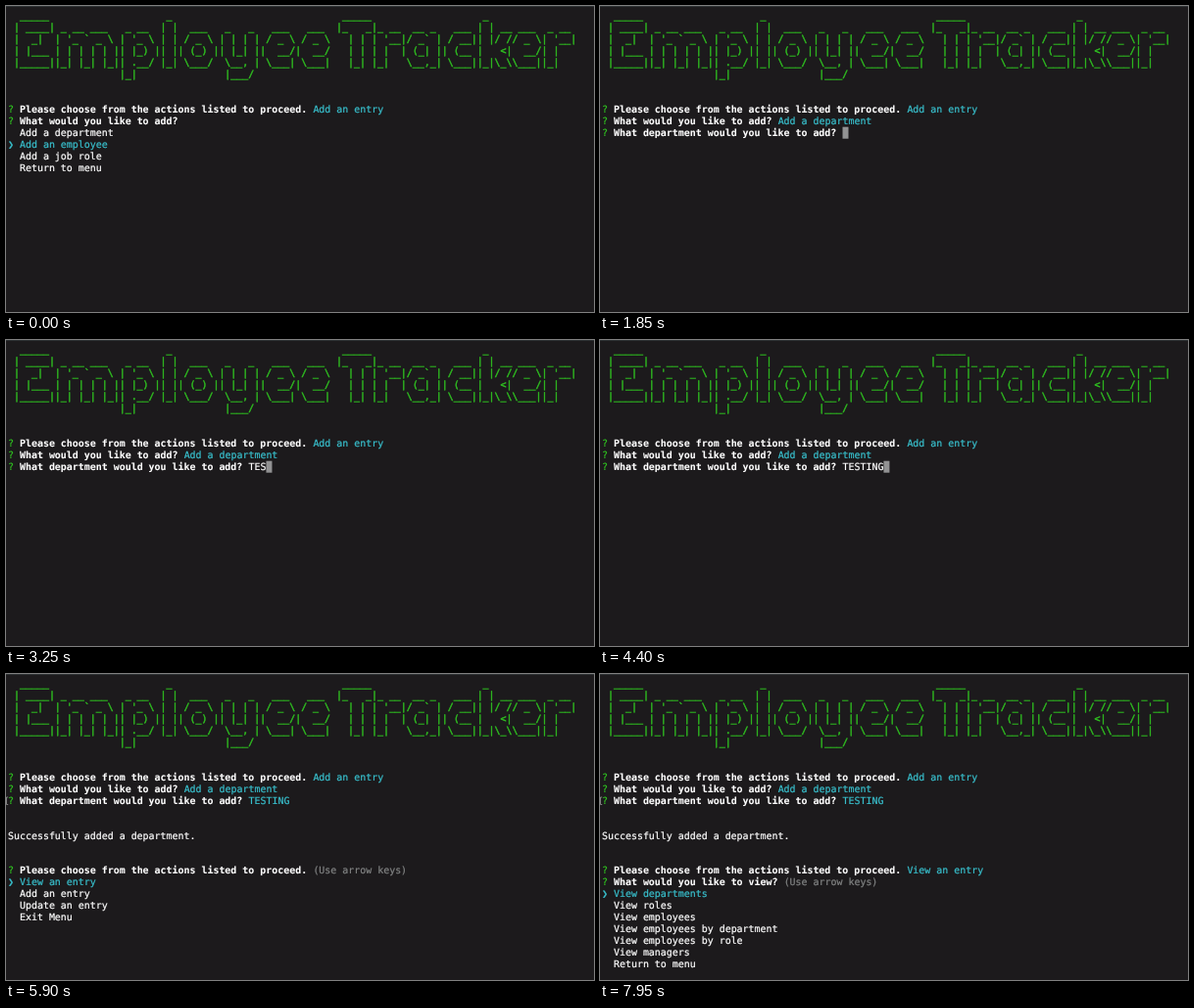
An HTML page that plays this animation: 600 by 313 pixels, repeating every 8000 ms.

```html
<!DOCTYPE html>
<html lang="en">
<head>
<meta charset="utf-8">
<title>Terminal session</title>
<style>
  html, body { margin: 0; width: 100%; height: 100%; overflow: hidden; background: #1c1a1c; }
  svg { display: block; width: 100vw; height: 100vh; }
  text {
    font: 9.946px "DejaVu Sans Mono", monospace;
    white-space: pre;
    text-rendering: geometricPrecision;
    color: #fff;
    fill: currentColor;
    stroke: currentColor;
    stroke-width: .22px;
  }
  .green { color: #2fbf20; }
  .cyan { color: #38bfcc; }
  .gray { color: #818383; }
  .bold { font-weight: bold; stroke-width: .1px; }
  #banner text { stroke-width: .45px; }
</style>
</head>
<body>
<svg viewBox="0 0 600 313">
  <rect width="600" height="313" fill="#1c1a1c"/>
  <rect width="600" height="1" fill="#2c3032"/>
  <g id="banner"></g>
  <g id="screen"></g>
  <path id="mark" d="M2.2 126H.5V133.5H2.2" fill="none" stroke="#9a9a9a" stroke-width=".8"/>
  <rect id="cursor" width="6" height="12" fill="#929293"/>
</svg>
<script>
const LOOP = 8000;
const CELL = 5.988, LINE = 11.95, LEFT = 2, BASE = 13.2;
const NS = "http://www.w3.org/2000/svg";
const $ = id => document.getElementById(id);
const colX = col => LEFT + col * CELL;
const rowY = row => BASE + row * LINE;

const BANNER = [
  "  _____" + " ".repeat(20) + "_" + " ".repeat(29) + "_____" + " ".repeat(19) + "_",
  " | ____| _ __ ___   _ __  | |  ___   _   _   ___   ___  |_   _|_ __  __ _   ___ | | __ ___  _ __",
  " |  _|  | '_ ` _ \\ | '_ \\ | | / _ \\ | | | | / _ \\ / _ \\   | | | '__|/ _` | / __|| |/ // _ \\| '__|",
  " | |___ | | | | | || |_) || || (_) || |_| ||  __/|  __/   | | | |  | (_| || (__ |   <|  __/| |",
  " |_____||_| |_| |_|| .__/ |_| \\___/  \\__, | \\___| \\___|   |_| |_|   \\__,_| \\___||_|\\_\\\\___||_|",
  " ".repeat(19) + "|_|" + " ".repeat(15) + "|___/"
];

const ACTION = "Please choose from the actions listed to proceed.";
const ADD = "What would you like to add?";
const DEPT = "What department would you like to add?";
const VIEW = "What would you like to view?";
const HINT = "(Use arrow keys)";
const ADD_MENU = ["Add a department", "Add an employee", "Add a job role", "Return to menu"];
const MAIN_MENU = ["View an entry", "Add an entry", "Update an entry", "Exit Menu"];
const VIEW_MENU = ["View departments", "View roles", "View employees", "View employees by department",
  "View employees by role", "View managers", "Return to menu"];

const WORD = "TESTING";
const KEYS = [2700, 2950, 3150, 3450, 3700, 3900, 4100];
const MOVE_UP = 450, PICK = 1250, SUBMIT = 4700, OPEN_VIEW = 6900;
const STEPS = [MOVE_UP, PICK, ...KEYS, SUBMIT, OPEN_VIEW];

function put(parent, row, col, str, cls = "") {
  const el = document.createElementNS(NS, "text");
  el.setAttribute("x", colX(col));
  el.setAttribute("y", rowY(row));
  el.setAttribute("class", cls);
  el.textContent = str;
  parent.append(el);
}

function ask(row, question, answer, cls = "cyan") {
  put(screen, row, 0, "?", "green");
  put(screen, row, 2, question, "bold");
  put(screen, row, question.length + 3, answer, cls);
}

function menu(row, items, selected) {
  items.forEach((item, i) => put(screen, row + i, 2, item, i === selected ? "cyan" : ""));
  put(screen, row + selected, 0, "❯", "cyan");
}

const screen = $("screen");
BANNER.forEach((line, row) => put($("banner"), row, 0, line, "green"));

function draw(t) {
  const typed = KEYS.filter(k => t >= k).length;
  const done = t >= SUBMIT, typing = t >= PICK && !done;
  screen.replaceChildren();

  ask(8, ACTION, "Add an entry");
  if (t < PICK) {
    ask(9, ADD, "");
    menu(10, ADD_MENU, t < MOVE_UP ? 1 : 0);
  } else {
    ask(9, ADD, ADD_MENU[0]);
    ask(10, DEPT, WORD.slice(0, typed), done ? "cyan" : "");
  }

  if (done) {
    put(screen, 13, 0, "Successfully added a department.");
    if (t < OPEN_VIEW) {
      ask(16, ACTION, HINT, "gray");
      menu(17, MAIN_MENU, 0);
    } else {
      ask(16, ACTION, MAIN_MENU[0]);
      ask(17, VIEW, HINT, "gray");
      menu(18, VIEW_MENU, 0);
    }
  }

  $("mark").style.display = done ? "" : "none";
  const cursor = $("cursor");
  cursor.style.display = typing ? "" : "none";
  cursor.setAttribute("x", colX(DEPT.length + 3 + typed));
  cursor.setAttribute("y", rowY(10) - 9);
}

const start = performance.now();
let shown = -1;
function tick() {
  const t = (performance.now() - start) % LOOP;
  // Redraw only when a step has been passed.
  const step = STEPS.filter(s => t >= s).length;
  if (step !== shown) draw(t);
  shown = step;
  requestAnimationFrame(tick);
}
tick();
</script>
</body>
</html>
```
